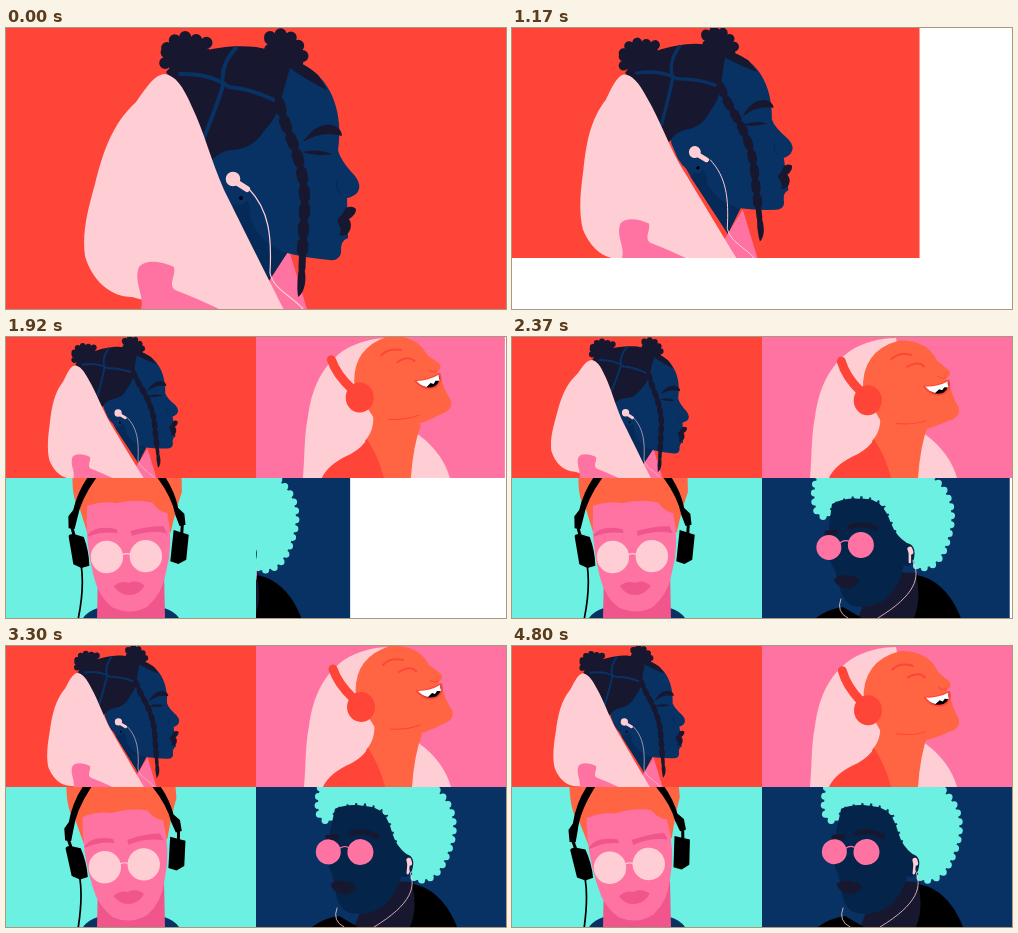
Animation, 500 px wide and 281 px high, one loop 4.83 s. Source, as an HTML page:

```html
<!DOCTYPE html>
<html lang="en">
<head>
<meta charset="utf-8">
<title>Four listeners</title>
<style>
  html, body { margin: 0; width: 100%; height: 100%; overflow: hidden; background: #fff; }
  body > svg { display: block; width: 100vw; height: 100vh; }
  path { stroke-linecap: round; stroke-linejoin: round; }
  .line { fill: none; }
  .red { fill: #ff4438; } .blush { fill: #ffced4; } .pink { fill: #ff73a3; }
  .rose { fill: #f0558c; } .navy { fill: #083164; } .deep { fill: #05244a; }
  .ink { fill: #17182f; } .mint { fill: #6bf0e1; } .orange { fill: #ff6542; }
</style>
</head>
<body>
<svg viewBox="0 0 500 281" preserveAspectRatio="none">

  <svg id="afro" width="250" height="140" viewBox="250 141 250 140">
    <rect class="navy" x="250" y="140" width="250" height="142"/>
    <path class="ink" d="M348 281L356 262L384 235L408 236L412 281Z"/>
    <path d="M306 281Q318 272 333 270L352 281ZM404 281Q412 262 406 238C426 241 442 257 451 281Z"/>
    <g id="afroHead">
      <path class="mint" stroke="#6bf0e1" stroke-width="7" stroke-dasharray="0 9"
        d="M311 130C304 146 302 162 308 177L316 181L323 166Q350 152 374 166L390 202L408 231C428 232 434 216 439 198C445 176 441 156 424 142L408 122Z"/>
      <path class="deep" d="M319 190L322 167Q336 160 352 162Q372 160 381 186Q386 199 397 206Q407 208 404 222Q400 232 394 228Q390 250 376 262Q356 274 341 268Q331 262 329 246L325 233L319 222Q322 212 319 190Z"/>
      <path class="line" stroke="#17182f" stroke-width="5" d="M340 190Q353 185 366 191M317 196L326 195"/>
      <path class="ink" d="M324 242Q333 236 339 239Q347 238 350 244Q343 253 334 251Q326 249 324 242Z"/>
      <path class="line" stroke="#ff73a3" stroke-width="1.2" d="M330 206Q335 202 340 205"/>
      <circle class="pink" cx="319" cy="210.5" r="12.5"/>
      <circle class="pink" cx="351" cy="208" r="13"/>
      <path class="line" stroke="#ffced4" stroke-width="5" d="M400 212L401 215"/>
      <path class="line" stroke="#ffced4" stroke-width="2.5" d="M400 216L400 225"/>
    </g>
    <path class="line" stroke="#ffced4" stroke-width=".8" d="M403 224C411 240 406 258 368 281M331 262Q326 275 338 281"/>
  </svg>

  <svg id="man" width="250" height="140" viewBox="0 141 250 140">
    <rect class="mint" y="140" width="250" height="142"/>
    <path class="navy" d="M77 281Q82 274 92 271L158 271Q168 274 173 281Z"/>
    <path class="rose" d="M92 235L158 235L159 281L91 281Z"/>
    <g id="manHead">
      <path class="orange" d="M70 126L178 126L178 156Q172 172 166 196L84 200L76 172Q66 160 70 126Z"/>
      <path class="pink" d="M83 168Q98 163 112 166Q132 162 148 166Q154 175 163 177Q169 208 160 238Q156 258 141 270Q124 279 106 270Q92 258 88 238Q80 205 83 168Z"/>
      <path class="rose" d="M83 197Q91 187 112 192L113 196Q98 193 83 199ZM126 194Q145 189 159 190L162 197Q145 193 127 199Z"/>
      <path class="rose" d="M108 249Q115 243 123 246Q131 242 139 249Q133 258 123 258Q114 258 108 249Z"/>
      <path class="line" stroke="#ffced4" stroke-width="1.2" d="M116 218Q121 215 126 218"/>
      <circle class="blush" cx="101.7" cy="219.5" r="16.2"/>
      <circle class="blush" cx="140.7" cy="219.5" r="16.2"/>
      <path d="M92 130Q75 148 69 172L64 178L64 190L70 191L73 180Q77 160 96 136ZM154 130Q170 150 174 172L180 178L181 189L175 190L171 179Q168 160 150 136Z"/>
      <path class="line" stroke="#000" stroke-width="3" d="M67 188L70 200M178 186L177 198"/>
      <path d="M64 199Q63 196 69 196L79 199Q84 213 84 228L76 230L68 226ZM169 194L184 199L181 224L173 228L165 225Z"/>
    </g>
    <path id="manCord" class="line" stroke="#000" stroke-width="1.7"/>
  </svg>

  <svg id="laugh" width="250" height="141" viewBox="250 0 250 141">
    <rect class="pink" x="250" width="250" height="141"/>
    <path class="blush" d="M298 141C300 118 299 100 303 80C307 50 318 28 338 14C352 5 368 1 384 1L400 84L414 98Q438 116 445 141Z"/>
    <path class="orange" d="M366 65Q373 90 360 104L378 141L406 141Q408 110 416 88Z"/>
    <path class="red" d="M317 141Q323 127 346 117Q358 110 362 102Q373 118 379 141Z"/>
    <g id="laughHead">
      <path class="orange" d="M350 52Q346 12 384 0Q412 -2 423 19L435 28Q438 33 432 36L436 41Q439 54 446 64Q449 74 437 78Q420 87 402 91Q382 96 370 83Z"/>
      <path class="line" stroke="#ff4438" stroke-width="2" d="M377 19Q384 11 397 14M393 26Q404 19 410 25"/>
      <path class="line" stroke="#ff4438" stroke-width="1" d="M424 34Q428 37 432 35M384 83Q402 84 414 79"/>
      <path stroke="#ff4438" stroke-width="2" d="M411 45Q424 45 435 38Q438 46 431 51Q420 56 411 45Z"/>
      <path fill="#fff" d="M412 45Q424 45 434 39L435 45L431 45L429 48L426 47L422 51Q416 50 412 45Z"/>
      <path class="line" stroke="#ff4438" stroke-width="9" d="M327 23Q332 38 347 52"/>
      <ellipse class="red" cx="355" cy="61" rx="14" ry="15"/>
    </g>
  </svg>

  <svg id="hooded" width="500" height="281" viewBox="0 0 500 281" preserveAspectRatio="none">
    <rect class="red" width="500" height="281"/>
    <path class="pink" d="M258 262L283 222L301 281L260 281Z"/>
    <g id="hoodedHead">
      <path class="navy" d="M170 46C200 20 270 22 300 38C328 55 337 88 332 122Q334 132 349 148Q357 159 350 166Q344 170 341 170L342 210Q334 212 335 225Q333 233 324 232Q300 230 281 225L262 254L225 180Z"/>
      <path fill="#062a58" d="M238 166Q246 178 244 190Q254 216 281 225L262 254L225 180Z"/>
      <path class="ink" d="M340 180Q346 177 350 181Q350 187 343 191Q347 197 343 204Q339 209 333 207Q337 203 332 195Q330 190 335 188Z"/>
      <path class="ink" d="M160 44C180 22 220 16 250 19Q285 25 312 47L321 62Q300 52 284 40L274 74Q271 90 258 103Q246 122 224 122Q212 124 203 135Q190 90 160 44Z"/>
      <path class="ink" stroke="#17182f" stroke-width="12" stroke-dasharray="0 11"
        d="M161 20Q168 9 181 9Q192 13 202 15Q199 24 188 31Q172 42 159 36ZM264 9Q276 2 288 12Q299 26 296 34Q280 36 264 26Z"/>
      <path class="line" stroke="#083164" stroke-width="4" d="M174 46Q204 45 223 59Q246 61 268 72M230 20Q214 36 217 58Q209 82 197 112"/>
      <path class="navy" d="M206 136Q214 122 230 127Q246 135 244 158Q246 174 234 177Q220 174 212 156Z"/>
      <path class="ink" d="M297 114Q309 95 326 97Q336 100 336 108Q316 102 297 114ZM296 124Q312 120 326 126Q310 129 296 124Z"/>
      <path class="line" stroke="#062a58" stroke-width="1.5" d="M332 152Q328 160 334 165"/>
      <circle cx="235" cy="170" r="2"/>
      <g id="braid" class="line" stroke="#17182f">
        <path stroke-width="7" d="M268 40Q270 74 284 108Q302 150 298 190L296 240"/>
        <path stroke-width="11" stroke-dasharray="7 11" d="M268 40Q270 74 284 108Q302 150 298 190L296 232"/>
        <path fill="#17182f" stroke="none" d="M294 236Q301 240 299 256Q297 266 292 269Q290 252 294 236Z"/>
      </g>
    </g>
    <path id="hood" class="blush" d="M158 46C148 47 140 60 130 74C106 96 97 124 89 156C81 184 76 206 79 228C86 252 104 269 126 269L170 281L190 310L292 310C258 242 234 194 218 162C205 132 198 104 186 79C177 58 169 47 158 46Z"/>
    <path class="pink" d="M135 281C139 268 127 254 133 239C140 230 158 234 168 239C170 248 162 256 169 262Q190 270 213 281Z"/>
    <g id="bud">
      <circle class="blush" cx="227" cy="151" r="7.3"/>
      <path class="line" stroke="#ffced4" stroke-width="6" d="M230 154L241 161"/>
    </g>
    <path class="line" stroke="#ffced4" stroke-width="1.2" d="M243 161C263 182 266 208 264 245C267 261 286 268 297 281"/>
  </svg>
</svg>

<script>
const LOOP = 4830;
const el = id => document.getElementById(id);
const set = (id, attrs) => {
  for (const name in attrs) el(id).setAttribute(name, attrs[name]);
};
const wave = (t, period, peak) => Math.cos(2 * Math.PI * (t - peak) / period);
const turn = (id, angle, x, y, extra = "") =>
  set(id, { transform: `rotate(${angle} ${x} ${y}) ${extra}` });

// Quadratic ease in and out between two times
function ease(t, start, end) {
  const u = Math.min(1, Math.max(0, (t - start) / (end - start)));
  return u < 0.5 ? 2 * u * u : 1 - 2 * (1 - u) ** 2;
}

function draw(t) {
  // Panels: the first shrinks, the others slide out from behind it
  const size = 1 - ease(t, 750, 1730) / 2;
  const drop = 141 * ease(t, 800, 1750);
  set("hooded", { width: 500 * size, height: Math.ceil(281 * size) });
  set("laugh", { x: 250 * ease(t, 1016, 1966) });
  set("man", { y: drop });
  set("afro", { x: 250 * ease(t, 1530, 2430), y: drop });

  // Heads moving to the music
  const nod = -3 + 3.8 * wave(t, 742, 78);
  turn("hoodedHead", nod, 240, 230);
  turn("braid", 0.3 * nod, 272, 45);
  turn("bud", 0.3 * nod, 240, 230);
  turn("hood", nod, 240, 230,
    `translate(160 0) scale(${1 + 0.013 * nod} 1) translate(-160 0)`);
  turn("laughHead", 1.5 + 2 * wave(t, 648, 309), 300, 80);
  turn("afroHead", 2.5 + 2.5 * wave(t, 1610, 0), 375, 247);

  const tilt = -3.4 - 3.5 * wave(t, 1610, 1341);
  turn("manHead", tilt, 123, 260);
  const a = tilt * Math.PI / 180;
  const cordX = 123 - 47 * Math.cos(a) + 31 * Math.sin(a);
  const cordY = 260 - 47 * Math.sin(a) - 31 * Math.cos(a);
  set("manCord", { d: `M${cordX} ${cordY}Q${cordX + 3} 252 72 283` });
}

function tick(now) {
  draw(now % LOOP);
  requestAnimationFrame(tick);
}
draw(0);
requestAnimationFrame(tick);
</script>
</body>
</html>
```
